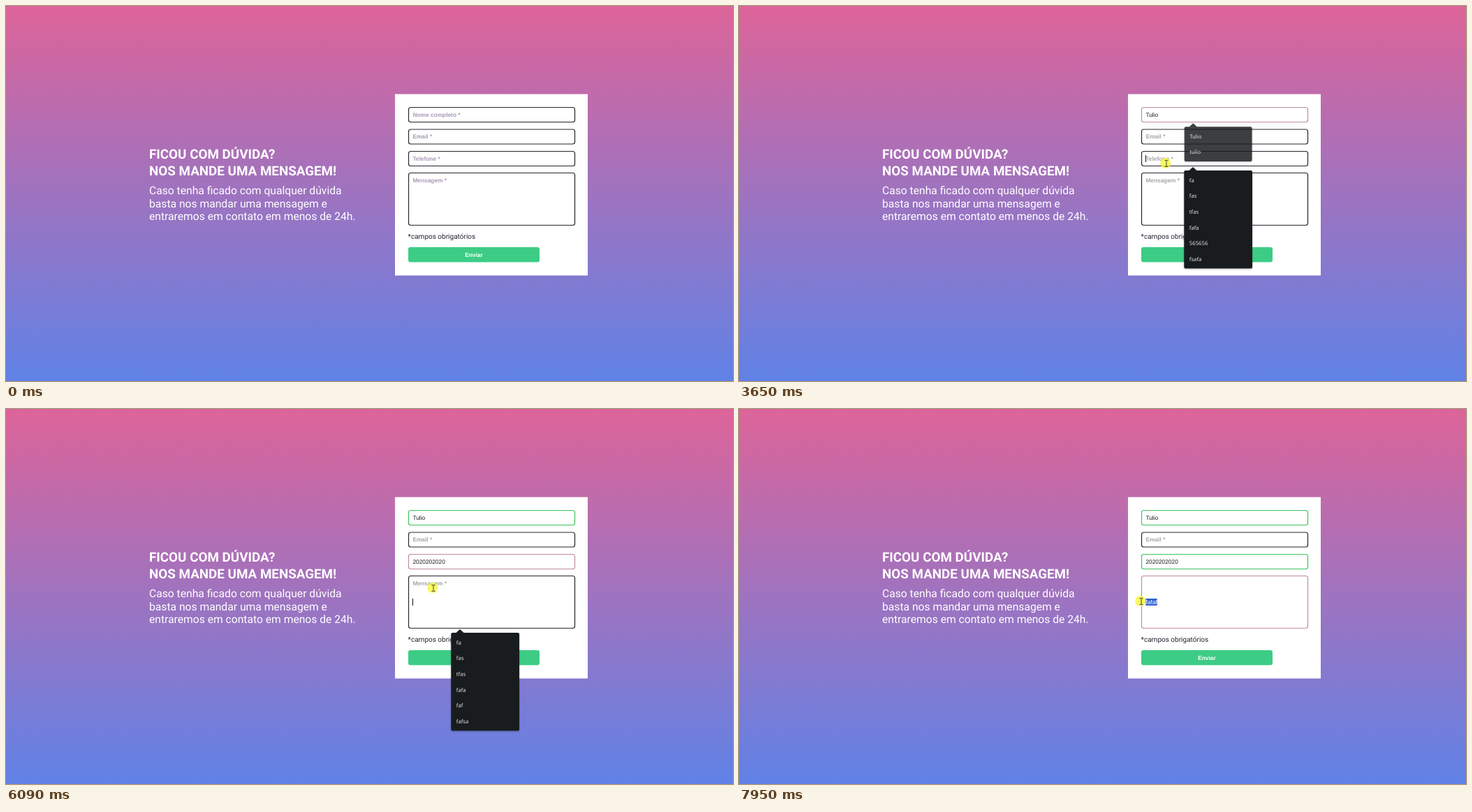
These frames come from a looping animation (1041x538 px, 8000 ms). An HTML page:

```html
<!DOCTYPE html>
<html lang="pt">
<head>
<meta charset="utf-8">
<title>Formulário de contato</title>
<style>
html, body { margin: 0; width: 100%; height: 100%; overflow: hidden; }
body { background: linear-gradient(#dd6499, #6082e6); }
svg { display: block; position: absolute; left: 0; top: 0; }
text { text-rendering: geometricPrecision; white-space: pre; }
.title { font: 700 18.81px Roboto, sans-serif; fill: #fff; }
.intro { font: 400 15.67px Roboto, sans-serif; fill: #fff; }
.note { font: 400 10.03px Roboto, sans-serif; fill: #222230; }
.label, .button { font: 700 8.36px "Liberation Sans", Arial, sans-serif; }
.button { fill: #fff; text-anchor: middle; }
.value { font: 400 8.36px "Liberation Sans", Arial, sans-serif; }
.item { font: 400 7.75px "Open Sans", sans-serif; fill: #eceeee; }
.list { filter: drop-shadow(0 1px 1px rgba(0, 0, 0, .3)); }
</style>
</head>
<body>
<svg id="stage" width="1041" height="538" viewBox="0 0 1041 538">
  <text class="title" x="205" y="219.2">FICOU COM DÚVIDA?</text>
  <text class="title" x="205" y="242.7">NOS MANDE UMA MENSAGEM!</text>
  <text class="intro" x="205" y="269.7">Caso tenha ficado com qualquer dúvida</text>
  <text class="intro" x="205" y="288.5">basta nos mandar uma mensagem e</text>
  <text class="intro" x="205" y="307.3">entraremos em contato em menos de 24h.</text>
  <rect x="557" y="126.4" width="276" height="260.2" fill="#fff"/>
  <text class="note" x="575.6" y="333.6">*campos obrigatórios</text>
  <rect x="576" y="346" width="188" height="21.6" rx="3" fill="#3dcc85"/>
  <text class="button" x="669.9" y="359.6">Enviar</text>
</svg>
<script>
const LOOP = 8000, BLINK = 530, TEXT_X = 582.4;
const DARK = [38, 38, 46], PINK = [193, 139, 160], GREEN = [62, 196, 95];
const stage = document.getElementById('stage');

// keys: the moment each character is typed
const fields = [
  { y: 145.5, h: 21, label: 'Nome completo *', labelY: 159, valueY: 159, text: 'Tulio',
    focus: 1020, blur: 3650, keys: [1620, 1890, 1960, 2020, 2090] },
  { y: 177, h: 21, label: 'Email *', labelY: 190.4, valueY: 190.4, text: '',
    focus: Infinity, blur: Infinity, keys: [] },
  { y: 208.5, h: 21, label: 'Telefone *', labelY: 222, valueY: 222, text: '2020202020',
    focus: 3650, blur: 6090,
    keys: [4400, 4470, 4600, 4670, 4940, 5010, 5540, 5610, 5740, 5810] },
  { y: 239.5, h: 75, label: 'Mensagem *', labelY: 253.4, valueY: 280, text: 'fafaf',
    focus: 6090, blur: Infinity, keys: [6570, 6640, 6900, 6970, 7120] }
];

// each view: start time and the suggestions shown from then on
const lists = [
  { y: 173, fade: 3630, views: [
    [1020, 'Tulio fa fas tfas fafa tulio'],
    [1620, 'Tulio tulio ta taa taiga taigao'],
    [1890, 'Tulio tulio']] },
  { y: 236, fade: 4425, views: [[3650, 'fa fas tfas fafa 565656 fsafa']] },
  { y: 321, fade: 7120, views: [
    [6090, 'fa fas tfas fafa faf fafsa'],
    [6570, 'fa fas fafa faf fafsa'],
    [6900, 'fafa faf fafsa'],
    [6970, 'fafa']] }
];
const FADE_MS = 135, ROW = 22.6;

const moves = [
  { from: 190, to: 750, steps: 9,
    path: [[873, 392], [800, 325], [690, 225], [634, 172], [626, 164.5]] },
  { from: 2820, to: 3580, steps: 12,
    path: [[618, 157], [580, 146], [527, 178], [534, 203], [585, 242], [612, 226]] },
  { from: 4870, to: 5670, steps: 10, path: [[612, 228], [611, 247], [612, 256]] },
  { from: 5740, to: 5810, steps: 2, path: [[612, 256.5], [612, 257]] },
  { from: 7000, to: 7350, steps: 6,
    path: [[625, 254], [710, 258], [758, 290], [700, 308], [652, 300]] },
  { from: 7400, to: 7600, steps: 3, path: [[650, 299], [645, 295.5]] },
  { from: 7810, to: 7950, steps: 3, path: [[628, 291], [576, 276]] }
];
const clicks = [[950, 1150], [3650, 3790], [6090, 6240], [7600, LOOP]];

function add(tag, attrs, parent = stage, text = '') {
  const el = document.createElementNS('http://www.w3.org/2000/svg', tag);
  set(el, attrs);
  el.textContent = text;
  parent.appendChild(el);
  return el;
}
function set(el, attrs) {
  for (const k in attrs) el.setAttribute(k, attrs[k]);
}
const show = (el, on) => { el.style.display = on ? '' : 'none'; };
const clamp = v => Math.max(0, Math.min(1, v));
const ease = v => v * v * (3 - 2 * v);
const mix = (a, b, p) => a.map((v, i) => v + (b[i] - v) * p);

for (const f of fields) {
  f.box = add('rect', { x: 576.5, y: f.y, width: 238, height: f.h, rx: 3, fill: '#fff', 'stroke-width': 1.2 });
  f.labelEl = add('text', { class: 'label', x: TEXT_X, y: f.labelY }, stage, f.label);
  f.mark = add('rect', { x: TEXT_X, y: f.valueY - 8, height: 10, fill: '#3162d2' });
  f.valueEl = add('text', { class: 'value', x: TEXT_X, y: f.valueY });
  f.caret = add('rect', { y: f.valueY - 8, width: 1, height: 10, fill: '#111' });
}
for (const l of lists) {
  l.group = add('g', { class: 'list' });
  l.views = l.views.map(([at, words]) => {
    const items = words.split(' '), h = 5 + ROW * items.length;
    const g = add('g', {}, l.group);
    add('path', { d: `M644 ${l.y + .5}L650 ${l.y - 5}L656 ${l.y + .5}Z`, fill: '#181c1e' }, g);
    add('rect', { x: 637.3, y: l.y, width: 97.7, height: h, rx: 2, fill: '#181c1e' }, g);
    items.forEach((s, i) => add('text', { class: 'item', x: 644.8, y: l.y + 16.7 + i * ROW }, g, s));
    return { at, g, mid: l.y + h / 2 };
  });
}
const halo = add('circle', { r: 7.5, fill: '#f8f83c', opacity: .8 });
const beam = add('path', { d: 'M-2.5-4.5H-.7L0-4L.7-4.5H2.5M0-4V4M-2.5 4.5H-.7L0 4L.7 4.5H2.5',
  fill: 'none', stroke: '#333', 'stroke-width': .9 });
const arrow = add('path', { d: 'M0 0V10L2.3 7.9L3.8 11.2L5.3 10.5L3.8 7.3H7Z',
  fill: '#fff', stroke: '#222', 'stroke-width': .7 });

function drawField(f, t) {
  const count = f.keys.filter(k => k <= t).length;
  const active = t >= f.focus && t < f.blur;
  const selected = f === fields[3] && t >= 7940;
  const border = mix(mix(DARK, PINK, ease(clamp((t - f.focus) / 290))), GREEN,
    ease(clamp((t - f.blur) / 290)));
  f.box.setAttribute('stroke', `rgb(${border.map(Math.round)})`);
  f.labelEl.setAttribute('fill', t < 950 ? '#a699b6' : '#a6a6a6');
  show(f.labelEl, !count);
  f.valueEl.textContent = f.text.slice(0, count);
  f.valueEl.setAttribute('fill', selected ? '#fff' : '#1c1c1c');
  const width = count ? f.valueEl.getComputedTextLength() : 0;
  f.mark.setAttribute('width', width);
  show(f.mark, selected);
  const last = Math.max(...[f.focus, 7600, ...f.keys].filter(k => k <= t), 0);
  const lit = Math.floor((t - last) / BLINK) % 2 === 0;
  f.caret.setAttribute('x', Math.round(TEXT_X + width - .2));
  show(f.caret, active && lit && t < 7880);
}

function drawList(l, t) {
  const alpha = 1 - clamp((t - l.fade) / FADE_MS);
  const view = l.views.filter(v => v.at <= t).pop();
  show(l.group, view && alpha > 0);
  if (!view) return;
  for (const v of l.views) show(v.g, v === view);
  const scale = 1 - .06 * (1 - alpha);
  set(l.group, { opacity: alpha,
    transform: `translate(686 ${view.mid}) scale(${scale}) translate(-686 ${-view.mid})` });
}

function pointer(t) {
  const m = moves.filter(v => v.from <= t).pop();
  if (!m) return null;
  const n = m.steps - 1;
  const p = Math.floor(clamp((t - m.from) / (m.to - m.from)) * n + .02) / n;
  const at = p * (m.path.length - 1), i = Math.min(Math.floor(at), m.path.length - 2);
  return mix(m.path[i], m.path[i + 1], at - i);
}

function drawPointer(t) {
  const pos = pointer(t);
  const inField = pos && fields.some(f =>
    pos[0] >= 576 && pos[0] <= 815 && pos[1] >= f.y && pos[1] <= f.y + f.h);
  show(beam, inField);
  show(arrow, pos && !inField);
  show(halo, clicks.some(([a, b]) => t >= a && t < b));
  if (!pos) return;
  const [x, y] = pos;
  set(beam, { transform: `translate(${x} ${y})` });
  set(arrow, { transform: `translate(${x} ${y})` });
  set(halo, { cx: x - 1.2, cy: y - .5 });
}

function frame() {
  const t = performance.now() % LOOP;
  for (const f of fields) drawField(f, t);
  for (const l of lists) drawList(l, t);
  drawPointer(t);
  requestAnimationFrame(frame);
}
frame();
</script>
</body>
</html>
```
